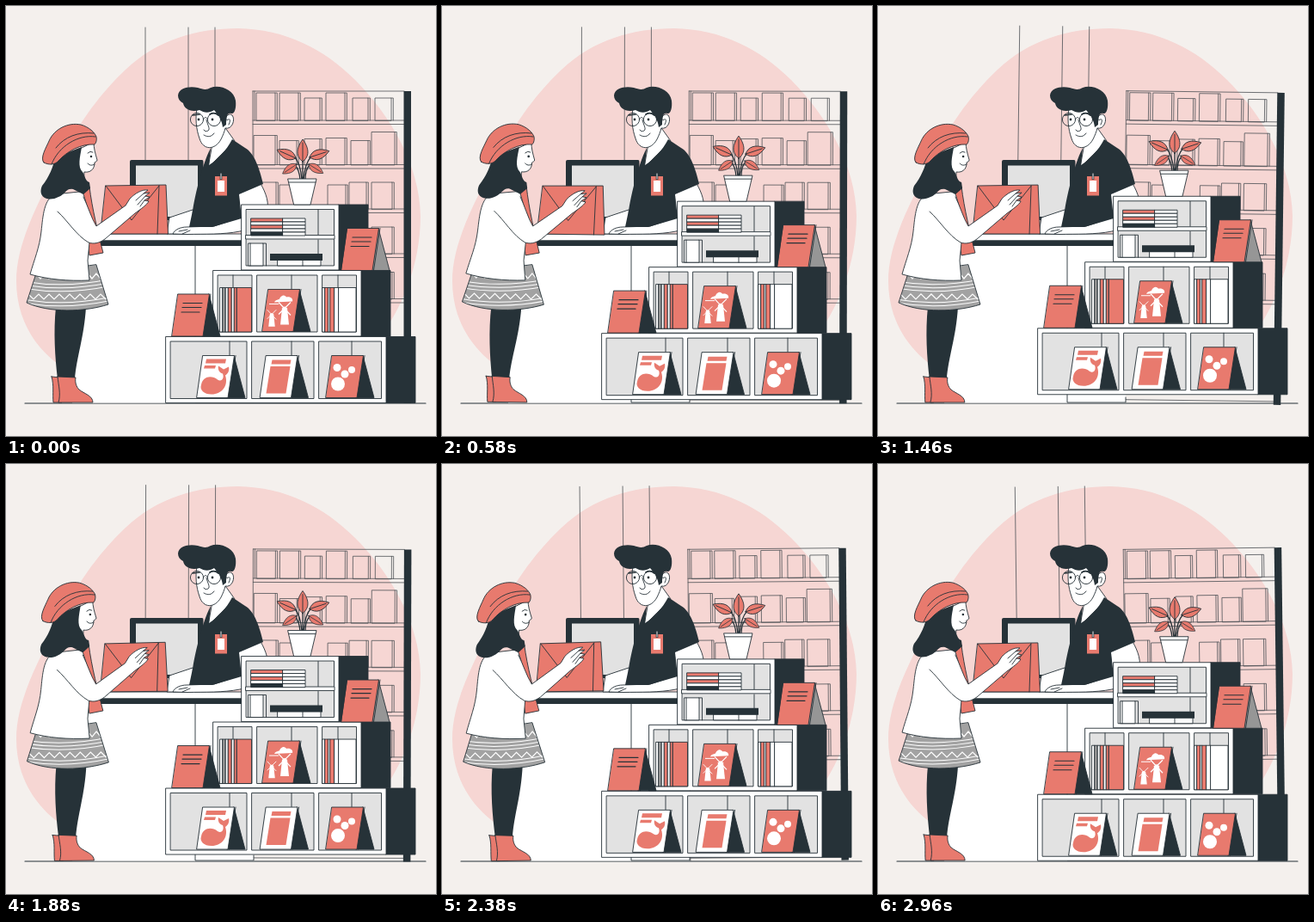
Write an HTML page that moves like this. It is 500 px wide and 500 px high and loops after 3000 ms.

```html
<!DOCTYPE html>
<html lang="en">
<head>
<meta charset="utf-8">
<title>Bookshop</title>
<style>
html,body{margin:0;width:100%;height:100%;overflow:hidden;background:#f4f0ed}
svg{display:block;width:100%;height:100%}
.k{stroke:#263238;stroke-width:.9;stroke-linejoin:round;stroke-linecap:round}
.w{fill:#fff}.c{fill:#e87a6e}.d{fill:#263238}.g{fill:#e2e2e2}.m{fill:#969696}.n{fill:none}
.p{stroke:#fff;fill:none}
</style>
</head>
<body>
<svg id="stage" viewBox="0 0 500 500"></svg>
<script>
const path = (cls, d, extra = '') => `<path class="${cls}" d="${d}" ${extra}/>`;
const rect = (cls, x, y, x2, y2) => path(cls, `M${x} ${y}H${x2}V${y2}H${x}Z`);
const disc = (cls, x, y, r) => `<circle class="${cls}" cx="${x}" cy="${y}" r="${r}"/>`;
const group = (content, id) => `<g id="${id}">${content}</g>`;

// Wall shelf and hanging cables
function wallShelf() {
  const rows = [
    [133, [291, 22, 32], [318, 22, 32], [347, 18, 26], [372, 22, 32], [403, 18, 26], [429, 19, 26]],
    [184.5, [288, 25, 34], [318, 20, 28], [347, 18, 30], [372, 22, 31], [401, 20, 28], [425, 27, 38]],
    [236, [290, 24, 31], [318, 20, 28], [374, 21, 28], [399, 20, 31], [425, 24, 31]],
    [288, [425, 24, 31]],
    [340.5, [425, 24, 31]]
  ];
  let lines = 'M162 25V181M212 25V181M243 25V110M287 99H463M287 99V461M289 99V133M287 458H463';
  for (const [base, ...books] of rows) {
    lines += `M287 ${base}H463M287 ${base + 4.5}H463`;
    for (const [x, w, h] of books)
      lines += `M${x} ${base}v${-h}h${w}v${h}zM${x + w} ${base - h}h2.3v${h}`;
  }
  return path('k n', lines, 'style="stroke:#4e5256;stroke-width:.8"') + rect('d', 462.5, 99, 471, 462);
}

function counter() {
  return rect('w', 77, 266, 288, 461.5) + rect('k w', 98, 265, 288, 273) + rect('d', 98, 272.5, 288, 279) +
    path('k n', 'M220 279V461H288V455');
}

function monitor() {
  return path('d', 'M146 179H228Q229.5 179 229.5 181V249H144V181Q144 179 146 179Z') + rect('g', 151, 185.5, 223, 245);
}

function clerk() {
  return path('k w', 'M217 237L190 246L187 265H212L217 258Z') +
    path('k w', 'M294 203C300 213 306 225 304 237C302 249 287 259 272 262C252 266 231 265 211 265.5L194 265C196 260 203 257 210 257L242 256L272 246L270 215Z') +
    path('n k', 'M201 262L211 260M205 265L214 261') +
    path('k w', 'M240 160L235 188L266 157L253 139Z') +
    path('d', 'M238 165C231 178 222 208 217 238L213 257L240 257L274 247L271 219L299 207C295 190 289 171 278 165L263 155C256 168 247 178 236 185Z') +
    path('k w', 'M222 119C220 130 221 143 225 154C229 168 243 168 250 155C252 151 254 146 255 142C263 144 267 132 263 127C259 124 256 128 255 132L250 119Z') +
    path('d', 'M200 104C201 95 213 93 223 95C229 97 233 98 238 95C248 91 265 97 267 110C268 118 266 126 262 125C257 123 256 130 256 138L252 141C251 134 249 130 246 126L242 121C236 125 230 124 225 121C214 124 207 119 206 113C202 111 200 108 200 104Z') +
    path('k n', 'M230 131C231 129 233 129 234 131M250 131L257 132M233 132C234 138 238 143 235 145C233 146 231 146 230 144M230 150C235 153 239 152 242 148M257 133C260 130 262 132 259 138') +
    path('k n', 'M217 127L225 126M237 126Q242 123 247 127', 'style="stroke-width:1.7"') +
    disc('k n', 222, 132, 7.6) + disc('k n', 242, 132, 7.6) + disc('d', 224, 132, 1.4) + disc('d', 240, 132, 1.4) +
    rect('c', 243, 198, 257, 220.5) + rect('w', 246, 203, 254, 216) + rect('d', 248.7, 194.5, 251.3, 202) +
    path('n k', 'M250 195V201', 'style="stroke:#fff"');
}

// Standing book with its prop, placed by the upper left corner of its box
const book = (x, y, cover, art = '', prop = 'd') => `<g transform="translate(${x} ${y})">` +
  path('k ' + prop, 'M43 0L56 49H35Z') + path('k ' + cover, 'M7 0H43.5L36 49H0Z') +
  path('k n', 'M45 0L37.5 49') + art + '</g>';

const textLines = path('k n', 'M13 10.5H35M12 15.5H34M11 21H32', 'style="stroke-width:1.2"');

const whale = path('c', 'M11 4H34L33 9H10ZM9 11.5H22L21 15H8Z') +
  path('c', 'M5 34C7 23 18 23 24 28C29 31 32 26 30 21C26 20 24 16 25 12L31 16L37 13C38 18 36 21 33 23C37 35 29 45 17 45C8 45 3 40 5 34Z');

const poster = path('c', 'M14 5H36L35 10H13ZM12 12.5H35L30 44H7Z');

const bubbles = [[13, 14, 4.5], [30, 16.5, 4], [22, 21.5, 4.5], [14, 33, 8]].map(b => disc('w', ...b)).join('');

const mill = (x, y, s) => `<g transform="translate(${x} ${y}) scale(${s})">` +
  path('w', 'M-3 0Q0 -4 3 0L5 19H-5Z') + path('p', 'M-7 -7L7 8M-7 7L7 -7', 'stroke-width="1.2"') + '</g>';

const mills = path('w', 'M14 15C16 11 19 13 20 11C23 5 27 7 28 9C33 8 36 11 35 14Z') +
  path('p', 'M8 17H19', 'stroke-width="1"') + mill(11, 29, .75) + mill(26, 22, 1);

function unit(x, y, x2, y2, dividers) {
  const cells = [x + 5.5, ...dividers.flatMap(v => [v, v + 6]), x2 - 5.5];
  let out = rect('k d', x2, y, x2 + 34, y2) + rect('k w', x, y, x2, y2);
  for (let i = 0; i < cells.length; i += 2) out += rect('k g', cells[i], y + 5.5, cells[i + 1], y2 - 5);
  return out;
}

function spines(x, y, y2, widths) {
  return widths.map(([w, cls]) => { const s = rect('k ' + cls, x, y, x + w, y2); x += w; return s; }).join('');
}

function plant() {
  const leaf = (x, y, angle, size) => `<g transform="translate(${x} ${y}) rotate(${angle}) scale(${size})">` +
    path('k c', 'M0 0C-8 -6 -8 -15 0 -26C8 -15 8 -6 0 0Z') + path('k n', 'M0 0V-22') + '</g>';
  return path('k n', 'M344 202C343 190 341 181 335 175M346 202C347 190 349 181 355 175M345 202V178M342 202Q341 190 336 185M348 202Q348 190 353 185', 'style="stroke-width:1.3"') +
    leaf(345, 181, 0, 1) + leaf(337, 177, -66, .92) + leaf(353, 176, 72, .92) +
    leaf(338, 184, -124, .76) + leaf(352, 184, 122, .76) +
    path('k w', 'M328 201H361L354 231H335Z') + path('k n', 'M329 205H360');
}

function display() {
  const layers = ['c', 'w', 'c', 'w', 'd'];
  const stack = layers.map((cls, i) => {
    const y = 247 + i * 4;
    return rect('k ' + cls, 285, y, 322, y + 4) + rect('k w', 322, y, 348, y + 4);
  }).join('');
  const top = unit(274, 231, 387, 307, []) + path('k n', 'M363 237V266M363 272V288') +
    rect('k w', 279, 266.5, 382, 271) + stack +
    rect('k w', 282, 276, 299, 302) + path('k n', 'M299 276H302.5V302M284 276V302') +
    rect('k w', 316, 295, 366, 302) + path('k n', 'M345 295V302') + rect('d', 307, 288, 368, 296);
  const middle = unit(241, 307.5, 413, 384, [286, 362]) + path('k n', 'M264 313V327M332 313V329M386 313V327') +
    spines(249, 327.5, 379, [[3, 'w'], [3.5, 'm'], [3, 'w'], [4, 'c'], [3, 'w'], [3, 'c'], [17, 'c']]) +
    spines(368, 327.5, 379, [[3, 'w'], [4, 'c'], [2, 'w'], [5, 'c'], [5, 'w'], [20, 'w']]);
  const bottom = unit(186, 384.5, 442, 461.5, [280, 358]) + path('k n', 'M260 390V406M332 390V406M402 390V406');
  return bottom + book(222, 406.5, 'w', whale) + book(295.5, 406.5, 'w', poster) + book(372, 406.5, 'c', bubbles) +
    middle + book(298, 329.5, 'c', mills) + book(193, 335, 'c', textLines) +
    top + book(390, 258.5, 'c', textLines, 'm') + plant();
}

function skirt() {
  const zigzag = (y, step) => {
    let d = `M20 ${y}`;
    for (let x = 20, up = true; x < 124; x += step, up = !up) d += `l${step} ${up ? -6 : 6}`;
    return d;
  };
  const shape = 'M35 311L24 345C50 357 91 356 119 347L105 301Z';
  const bands = [320, 324, 328, 341, 345].map(y => `M20 ${y}Q70 ${y + 9} 124 ${y - 3}`).join('');
  return `<clipPath id="skirt"><path d="${shape}"/></clipPath>` + path('', shape, 'fill="#a2a2a2"') +
    `<g clip-path="url(#skirt)">` + path('p', bands, 'stroke-width="1"') +
    path('p', zigzag(341, 6) + zigzag(317, 5), 'stroke-width="1.2"') + '</g>' + path('k n', shape);
}

function customer() {
  const bag = path('k c', 'M116 209L186 208L188.5 265H110Z') +
    path('k n', 'M116 209L146 249L178 209M178 209L176 265');
  const legs = path('d', 'M58 350C55 379 57 408 60 434H80C82 408 91 385 93 350Z') +
    path('k c', 'M53 431L63 432L65 461H55C54 451 56 441 53 431Z') +
    path('k c', 'M60 431L81 432C80 438 82 443 85 446C91 451 101 453 101 461H61C64 451 61 441 60 431Z');
  const scarf = path('k c', 'M91 207L97 210C100 235 107 264 113 287L97 290L88 230Z');
  const shirt = path('k w', 'M57 219C44 224 43 244 41 262C39 281 33 294 28 312C49 318 72 320 97 319L95 296L97 275C103 274 96 234 89 216Z');
  const arm = path('k w', 'M60 239C72 250 82 267 96 275C102 277 108 276 115 271L150 241C157 236 164 231 166 227L161 226L167 222L162 221L167 217L160 218L165 214C158 213 150 218 144 224L139 232L105 256C99 246 95 232 90 222') +
    path('k n', 'M151 226L160 218M153 231L162 221M156 233L161 226');
  const head = path('k w', 'M82 168L102 158C102 166 104 172 106 179C106 181 104 181 103 182C103 190 98 194 91 193L90 210L74 212Z') +
    path('d', 'M57 176C55 187 50 199 42 209C36 223 50 228 61 222C69 219 70 211 78 213L90 219L98 212L97 205C92 204 92 197 89 193C83 187 86 176 88 164Z') +
    path('k n', 'M95 171Q98 168 101 170M95 183Q98 187 103 184') + disc('d', 99, 175, 1.3) +
    path('k c', 'M44 182C39 177 47 164 50 157C56 143 72 135 87 138C97 141 103 147 105 152C106 157 104 160 103 161C87 160 71 169 61 180C57 185 49 185 44 182Z') +
    path('k n', 'M104 152C84 149 61 163 53 184M102 148C84 146 68 152 58 165');
  return bag + legs + skirt() + scarf + shirt + arm + head;
}

const stage = document.getElementById('stage');
stage.innerHTML =
  path('', 'M12 320C12 278 35 232 61 184C78 146 106 105 139 74C176 39 222 26 270 26C325 27 370 50 406 86C447 127 481 185 482 244C482 300 460 356 430 390C360 445 170 455 92 434C45 415 12 374 12 320Z', 'fill="#f6d6d3"') +
  group(wallShelf(), 'wall') +
  path('k n', 'M22 462H488', 'style="stroke-width:1.2"') +
  counter() + monitor() + clerk() +
  group(display(), 'display') + group(customer(), 'customer');

const LOOP = 3000, WALL_DELAY = 500;
const [wall, shelf, woman] = ['wall', 'display', 'customer'].map(id => document.getElementById(id));

// Sway in degrees: 0 → 1 → -1 → 0
function sway(ms) {
  const p = Math.max(0, ms) / LOOP;
  return p < .25 ? 4 * p : p < .75 ? 2 - 4 * p : 4 * p - 4;
}

function draw(ms) {
  const lift = 10 * (1 - Math.abs(1 - 2 * ms / LOOP));
  wall.setAttribute('transform', `rotate(${sway(ms - WALL_DELAY)} 316 243)`);
  shelf.setAttribute('transform', `translate(0 ${-lift})`);
  woman.setAttribute('transform', `rotate(${sway(ms)} 106 300)`);
}

const start = performance.now();
function tick() {
  draw((performance.now() - start) % LOOP);
  requestAnimationFrame(tick);
}
draw(0);
requestAnimationFrame(tick);
</script>
</body>
</html>
```
